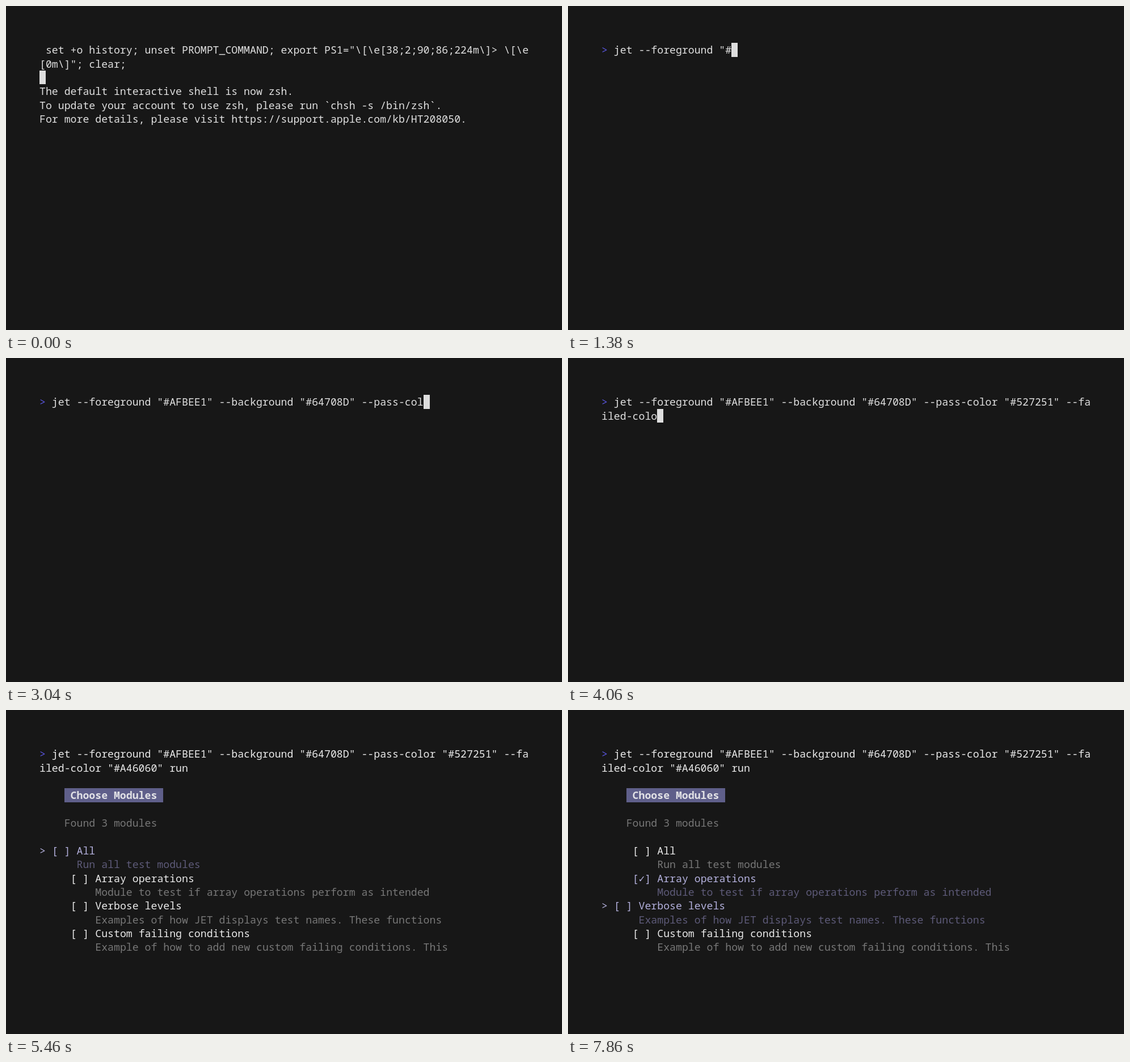
Recreate the animation shown at these times as an HTML page. Size 980 px wide and 572 px high, loop 8000 ms.

```html
<!DOCTYPE html>
<html lang="en">
<head>
<meta charset="utf-8">
<title>Terminal</title>
<style>
  html, body { margin: 0; width: 100%; height: 100%; overflow: hidden; background: #171717; }
  #term {
    position: relative; width: 980px; height: 572px; overflow: hidden; background: #171717;
    font: 18.2px/24.36px "Noto Sans Mono", "DejaVu Sans Mono", monospace;
    font-variant-ligatures: none; color: #e0e0e0;
  }
  #term span { position: absolute; white-space: pre; height: 24.36px; }
  #term .prompt { color: #5a56e0; }
  #term .bright { color: #eaeaea; }
  #term .dim { color: #777; }
  #term .pick { color: #b3b0dc; }
  #term .pickDim { color: #5d5a78; }
  #term .banner { color: #e2e2e6; background: #5f5f8a; font-weight: 700; }
  #term .cursor { width: 10.92px; background: #dedede; }
</style>
</head>
<body>
<div id="term"></div>
<script>
const LOOP = 8000, LEFT = 59, TOP = 65.3, CELL_W = 10.917, CELL_H = 24.36, COLS = 79;
const term = document.getElementById('term');

const intro = [
  [0, ' set +o history; unset PROMPT_COMMAND; export PS1="\\[\\e[38;2;90;86;224m\\]> \\[\\e'],
  [1, '[0m\\]"; clear;'],
  [3, 'The default interactive shell is now zsh.'],
  [4, 'To update your account to use zsh, please run `chsh -s /bin/zsh`.'],
  [5, 'For more details, please visit https://support.apple.com/kb/HT208050.']
];
const command = 'jet --foreground "#AFBEE1" --background "#64708D" ' +
  '--pass-color "#527251" --failed-color "#A46060" run';
const modules = [
  ['All', 'Run all test modules'],
  ['Array operations', 'Module to test if array operations perform as intended'],
  ['Verbose levels', 'Examples of how JET displays test names. These functions'],
  ['Custom failing conditions', 'Example of how to add new custom failing conditions. This']
];

// Typing rhythm: [characters typed, time in ms], even pace in between.
const rhythm = [
  [1, 660], [19, 1380], [20, 1440], [21, 1480], [40, 2240], [41, 2260],
  [42, 2320], [61, 3080], [62, 3100], [63, 3160], [82, 3920], [83, 3940],
  [84, 4000], [86, 4060], [87, 4100], [101, 4620]
];

function typedAt(t) {
  if (t < rhythm[0][1]) return 0;
  for (let i = 1; i < rhythm.length; i++) {
    const [n0, t0] = rhythm[i - 1], [n1, t1] = rhythm[i];
    if (t < t1) return n0 + Math.floor((t - t0) / (t1 - t0) * (n1 - n0) + 1e-6);
  }
  return command.length;
}

function put(row, col, text, cls = '') {
  const el = document.createElement('span');
  el.className = cls;
  el.textContent = text;
  el.style.left = LEFT + col * CELL_W + 'px';
  el.style.top = TOP + row * CELL_H + 'px';
  term.append(el);
}

function drawCommand(n, cls) {
  const room = COLS - 2, text = command.slice(0, n);
  put(0, 0, '>', 'prompt');
  put(0, 2, text.slice(0, room), cls);
  put(1, 0, text.slice(room), cls);
}

function drawMenu(focus, checked) {
  put(3, 4, ' Choose Modules ', 'banner');
  put(5, 4, 'Found 3 modules', 'dim');
  modules.forEach(([name, info], i) => {
    const row = 7 + i * 2, focused = i === focus, ticked = i === checked;
    const lit = focused || ticked;
    const col = focused && !ticked ? 2 : 5;
    const cls = lit ? 'pick' : 'bright';
    if (focused) put(row, 0, '>', cls);
    put(row, col, '[', cls);
    if (ticked) put(row, col + 1, '✓', cls);
    put(row, col + 2, ']', cls);
    put(row, col + 4, name, cls);
    put(row + 1, col + 4, info, lit ? 'pickDim' : 'dim');
  });
}

// Everything visible at time t.
function stateAt(t) {
  if (t < 20) return { intro: true, cursor: [2, 0] };
  const typed = typedAt(t);
  if (t >= 5420) {
    return { typed, focus: t < 6800 ? 0 : t < 7860 ? 1 : 2, checked: t < 7320 ? -1 : 1 };
  }
  const pos = typed + 2;
  let cursor = [Math.floor(pos / COLS), pos % COLS];
  if (t >= 5240) cursor = [2, 0];
  else if (t >= 4980 || (t >= 440 && t < 660)) cursor = null;
  return { typed, cursor };
}

function draw(s) {
  term.replaceChildren();
  if (s.intro) {
    intro.forEach(([row, text]) => put(row, 0, text));
  } else {
    const menu = s.focus !== undefined;
    drawCommand(s.typed, menu ? 'bright' : '');
    if (menu) drawMenu(s.focus, s.checked);
  }
  if (s.cursor) put(...s.cursor, '', 'cursor');
}

let shown = '';
const start = performance.now();
function tick() {
  const state = stateAt((performance.now() - start) % LOOP);
  const key = JSON.stringify(state);
  if (key !== shown) {
    shown = key;
    draw(state);
  }
  requestAnimationFrame(tick);
}
tick();
</script>
</body>
</html>
```
